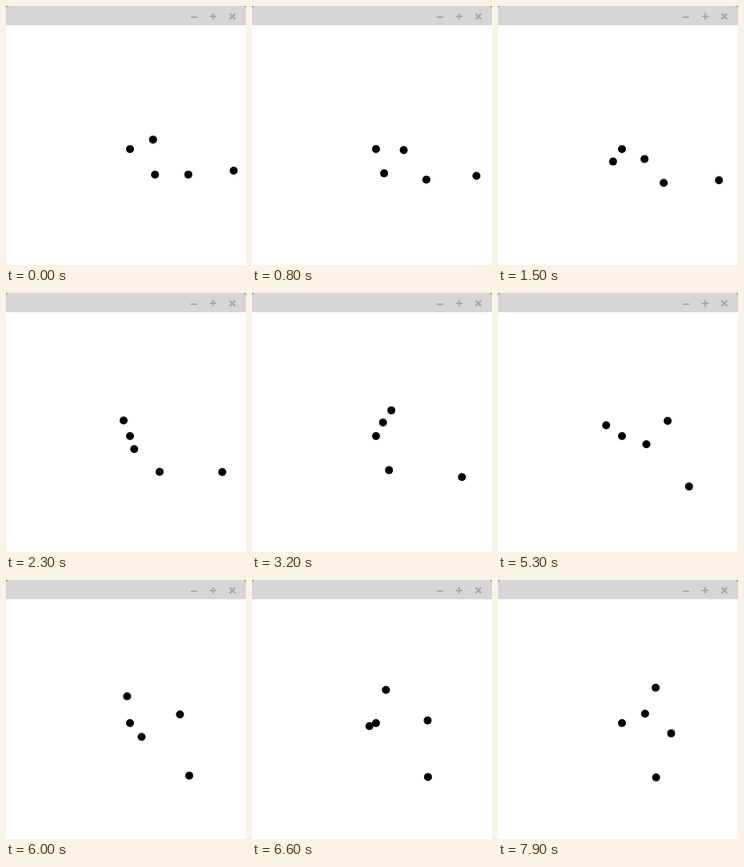
Recreate the animation shown at these times as an HTML page. Size 300 by 324 pixels, loop 8 s.

```html
<!DOCTYPE html>
<html lang="en">
<head>
<meta charset="utf-8">
<title>Orbits</title>
<style>
html, body { margin: 0; width: 100%; height: 100%; overflow: hidden; background: #fff; }
svg { display: block; }
</style>
</head>
<body>
<svg width="300" height="324" viewBox="0 0 300 324">
  <rect width="300" height="12" fill="#808080"/>
  <path d="M0 24V4Q0 0 4 0H296Q300 0 300 4V24Z" fill="#d6d6d6"/>
  <g fill="none" stroke="#a8a8a8" stroke-width="2">
    <path d="M231 14h8M255 13h8M259 9v8"/>
    <path d="M279.5 9.5l7 7m0-7l-7 7" stroke-width="2.4"/>
  </g>
  <g id="bodies"><circle cx="155" cy="179" r="5"/></g>
</svg>
<script>
const LOOP = 8000, STEP = 100;
const SUN = { x: 155, y: 179 }, E = 0.6, UNIT = 56;

// Semi-major axis, mean anomaly from aphelion at the start, radians per second
const planets = [
  [0.387, 5.12, 1.591],
  [0.723, 1.99, 0.6253],
  [1, 1.22, 0.3862],
  [1.524, 0.644, 0.2056]
].map(([axis, phase, rate]) => {
  const dot = document.querySelector('circle').cloneNode();
  document.getElementById('bodies').append(dot);
  return { a: axis * UNIT, phase, rate, dot };
});

// Kepler's equation measured from aphelion: M = p + E sin p
function solve(M) {
  M %= 2 * Math.PI;
  let p = M;
  for (let i = 0; i < 40; i++) {
    p -= 0.8 * (p + E * Math.sin(p) - M) / (1 + E * Math.cos(p));
  }
  return p;
}

function draw(now) {
  const t = Math.floor(now % LOOP / STEP) * STEP / 1000;
  for (const { a, phase, rate, dot } of planets) {
    const p = solve(phase + rate * t);
    dot.setAttribute('cx', SUN.x + a * (E + Math.cos(p)));
    dot.setAttribute('cy', SUN.y + a * Math.sqrt(1 - E * E) * Math.sin(p));
  }
}

const start = performance.now();
function tick() {
  draw(performance.now() - start);
  requestAnimationFrame(tick);
}
tick();
</script>
</body>
</html>
```
